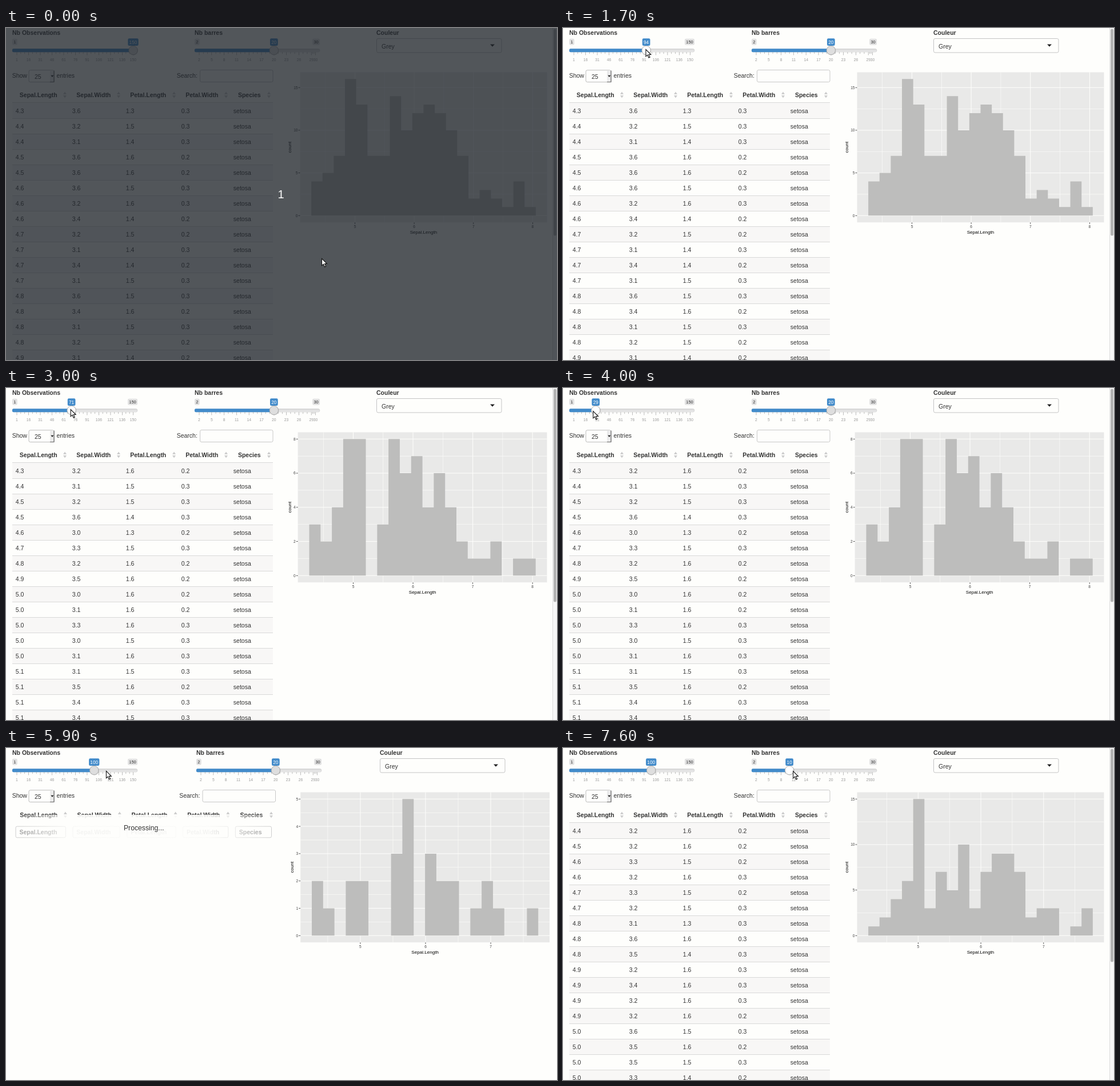
An HTML page for the animation above (8000 ms loop, 964 by 581 pixels).

```html
<!DOCTYPE html>
<html lang="fr">
<head>
<meta charset="utf-8">
<title>Iris</title>
<style>
html, body { margin: 0; width: 100%; height: 100%; overflow: hidden; background: #fefefc; }
svg { display: block; font-family: "Liberation Sans", Arial, sans-serif; }
</style>
</head>
<body>
<svg id="stage" width="964" height="581" viewBox="0 0 964 581"></svg>
<script>
const LOOP = 8000, STEP = 100, PAGE = '#fefefc';
const stage = document.getElementById('stage');

// Samples: bin counts, longest sepal, sorted sepal lengths as [row, length] key points
const samples = [
  { counts: [4, 5, 7, 16, 13, 7, 7, 14, 10, 12, 13, 12, 10, 7, 2, 3, 2, 1, 4, 1], hi: 7.9,
    sepals: [[0, 4.3], [5, 4.58], [16, 4.87]], thumb: 362 },
  { counts: [3, 2, 4, 8, 8, 0, 3, 8, 6, 7, 4, 6, 4, 2, 1, 1, 2, 0, 1, 1], hi: 7.9,
    sepals: [[0, 4.3], [8, 4.96], [16, 5.14]], thumb: 373 },
  { counts: [2, 1, 0, 2, 2, 0, 0, 3, 5, 0, 3, 2, 2, 0, 1, 2, 1, 0, 0, 1], hi: 7.6,
    sepals: [[0, 4.6], [4, 4.87], [10, 5.08], [11, 5.5], [15, 5.68], [16, 6.6]], thumb: 373 },
  { counts: [1, 2, 4, 6, 15, 3, 7, 5, 10, 3, 7, 9, 9, 7, 2, 3, 3, 0, 1, 3], hi: 7.7,
    sepals: [[0, 4.42], [4, 4.72], [16, 5.05]], thumb: 373 }
];
// Smallest value and spread of sepal width, petal length, petal width
const species = {
  setosa: [[3, .6], [1.3, .35], [.15, .2]],
  versicolor: [[2.4, .6], [3.9, .7], [1.2, .3]]
};
const heads = ['Sepal.Length', 'Sepal.Width', 'Petal.Length', 'Petal.Width', 'Species'];
const edges = [11, 110, 204, 301, 392, 467];

// Phases: start time, sample, busy flag
const phases = [[0, 0, 0], [2600, 0, 1], [3000, 1, 0], [4600, 1, 1], [5000, 2, 0], [5900, 2, 1], [6300, 3, 0]];
const obsKeys = [[1100, 150], [2000, 74], [2100, 74], [2400, 71], [3400, 71], [4000, 29],
  [4200, 29], [4500, 27], [5000, 27], [5800, 100]];
const binKeys = [[6900, 20], [7100, 17], [7200, 17], [7600, 10]];

const linear = u => u, smooth = u => u * u * (3 - 2 * u);
function track(keys, t, ease = smooth) {
  const i = keys.findIndex(k => k[0] > t);
  if (i === 0) return keys[0].slice(1);
  if (i < 0) return keys[keys.length - 1].slice(1);
  const a = keys[i - 1], b = keys[i], e = ease((t - a[0]) / (b[0] - a[0]));
  return a.slice(1).map((v, j) => v + (b[j + 1] - v) * e);
}
function noise(n) {
  const v = Math.sin(n * 12.9898) * 43758.5453;
  return v - Math.floor(v);
}

const rect = (x, y, w, h, fill, more = '') =>
  `<rect x="${x}" y="${y}" width="${w}" height="${h}" fill="${fill}" ${more}/>`;
const text = (x, y, s, size = 10.5, fill = '#333', more = '') =>
  `<text x="${x}" y="${y}" font-size="${size}" fill="${fill}" ${more}>${s}</text>`;
const poly = (d, fill, more = '') => `<path d="${d}" fill="${fill}" ${more}/>`;
const box = (x, y, w, h, stroke = '#c4c4c4') => rect(x, y, w, h, PAGE, `rx="2.5" stroke="${stroke}"`);
const BOLD = 'font-weight="700"', MID = 'text-anchor="middle"', END = 'text-anchor="end"';

const defs = `<defs>
<linearGradient id="veil"><stop offset="0" stop-color="${PAGE}" stop-opacity="0"/>
<stop offset=".25" stop-color="${PAGE}" stop-opacity=".9"/><stop offset=".75" stop-color="${PAGE}" stop-opacity=".9"/>
<stop offset="1" stop-color="${PAGE}" stop-opacity="0"/></linearGradient>
<linearGradient id="rail" x2="0" y2="1"><stop offset="0" stop-color="#d6d6d6"/><stop offset="1" stop-color="#eee"/></linearGradient>
</defs>`;

const obsScale = { x: 11, label: 'Nb Observations', min: 1, max: 150, step: 15 };
const binScale = { x: 330, label: 'Nb barres', min: 2, max: 30, step: 3 };
const along = (c, v) => c.x + 8 + (v - c.min) / (c.max - c.min) * 203.5;

function pill(cx, s, size, h, y, fill, ink) {
  const w = String(s).length * size * .556 + 4.5;
  return rect(cx - w / 2, y, w, h, fill, 'rx="2.2"') + text(cx, 24.6 + size * .36, s, size, ink, MID);
}

function slider(c, v, hot, dx = 0) {
  const { x, min, max, step } = c, hx = along(c, v), endW = String(max).length * 4.17 + 4.5;
  let s = text(x, 12, c.label, 10.5, '#333', BOLD);
  for (let n = min; n <= max; n += step) {
    const next = Math.min(n + step, max);
    s += rect(along(c, n) - .4, 42, .8, 5.5, '#aaa') + text(along(c, n), 58.3, n, 6.75, '#999', MID);
    for (const k of [1, 2])
      s += rect(along(c, n + (next - n) * k / 3) - .4, 42, .8, 3.2, '#aaa');
  }
  s += rect(along(c, max) - .4, 42, .8, 5.5, '#aaa') + text(along(c, max), 58.3, max, 6.75, '#999', MID);
  s += rect(x + .3, 36.5, 218.6, 5.5, 'url(#rail)', 'rx="2.5" stroke="#ccc" stroke-width=".6"');
  s += rect(x, 36.3, hx - x, 6, '#428bca', 'rx="2"');
  s += pill(x + 4.35, min, 7.5, 11, 18.8, '#e1e1e1', '#333');
  if (hx + 9 < x + 219 - endW) s += pill(x + 219 - endW / 2, max, 7.5, 11, 18.8, '#e1e1e1', '#333');
  s += pill(hx, Math.round(v), 8.25, 12.6, 18.3, '#428bca', '#fff');
  s += `<circle cx="${hx + .5}" cy="39.7" r="8" fill="#000" opacity=".15"/>
<circle cx="${hx}" cy="39" r="7.7" fill="${hot ? '#fff' : '#dedede'}" stroke="#aaa" stroke-width=".9"/>`;
  return `<g transform="translate(${dx} 0)">${s}</g>`;
}

function controls(busy) {
  const c = busy ? 654 : 648, q = busy ? 4.5 : 0;
  return text(c, 12, 'Couleur', 10.5, '#333', BOLD) + box(c + .5, 18.5, 218.5, 24.5) +
    text(c + 9, 36, 'Grey') + poly(`M${c + 199} 28.5h8l-4 4.2z`, '#222') +
    text(10.7, 87, 'Show') + box(40, 73.8, 44, 20.8, '#bbb') + rect(77, 74.5, 7, 19.6, '#ebebeb') +
    poly('M84 74.5V94.5H77', 'none', 'stroke="#666" stroke-width="1.2"') +
    poly('M78.4 82.7h5l-2.5 3.2z', '#222') + text(50, 89, '25') + text(88.5, 87, 'entries') +
    text(298.7 + q, 87, 'Search:') + box(339.5 + q, 73.5, 127.5, 21, '#c8c8c8');
}

function header(busy) {
  const grow = busy ? 460 / 456 : 1;
  const at = edges.map(e => 11 + (e - 11) * grow);
  let s = '', fields = '';
  heads.forEach((h, i) => {
    const l = at[i], r = at[i + 1];
    s += text((l + r) / 2 - 3.7, 121, h, 10.5, '#333', `${BOLD} ${MID}`) +
      poly(`M${r - 10} 116h6l-3 -4.5zm0 2h6l-3 4.5z`, '#ccc');
    fields += box(l + 6, 137.2, r - l - 12.5, 19.6, '#ccc') + text(l + 12.5, 151, h, 10.5, '#999', BOLD);
  });
  return busy ? s + fields + rect(11, 117, 460, 46, 'url(#veil)') +
    text(241.2, 144, 'Processing...', 12.2, '#333', MID) : s;
}

function table(id) {
  let s = '';
  for (let i = 0; i < 17; i++) {
    const y = 131 + 27 * i, sepal = track(samples[id].sepals, i, linear)[0];
    const kind = sepal < 5.3 ? 'setosa' : 'versicolor';
    const sizes = species[kind].map(([low, spread], j) => low + spread * noise(id * 99 + i * 3 + j + 1));
    const cells = [sepal, ...sizes].map(n => n.toFixed(1)).concat(kind);
    if (i % 2 === 0) s += rect(11, y, 456, 27, '#f8f7f6');
    s += rect(11, y - (i ? 0 : 1), 456, 1, '#d9d9d9');
    cells.forEach((c, j) => s += text(edges[j] + 5.8, y + 18, c));
  }
  return s;
}

function chart({ counts, hi }, dx) {
  const max = Math.max(...counts), tick = max > 10 ? 5 : max > 5 ? 2 : 1;
  const L = max > 9 ? 514.5 : 510.7, R = 946.5, top = 77.5, bottom = 340.2, zero = 328.3;
  const lo = 4.3, bin = (hi - lo) / 19, barW = (R - L) / 22, left = L + barW;
  const start = (Math.floor(lo / bin - .5) + .5) * bin;
  const px = n => left + (n - start) / bin * barW, py = n => zero - n / max * 239;
  let s = rect(L, top, R - L, bottom - top, '#e9e9e8'), axes = '';
  for (let n = 0; n <= max; n += tick / 2) {
    const major = n % tick === 0, w = major ? 1 : .6;
    s += rect(L, py(n) - w / 2, R - L, w, PAGE);
    if (major) axes += rect(L - 3, py(n) - .4, 3, .8, '#333') + text(L - 4, py(n) + 2.4, n, 6.6, '#444', END);
  }
  for (let n = 4.5; px(n) < R; n += .5) {
    const major = n % 1 === 0, w = major ? 1 : .6;
    s += rect(px(n) - w / 2, top, w, bottom - top, PAGE);
    if (major) axes += rect(px(n) - .4, bottom, .8, 2.8, '#333') + text(px(n), 349.6, n, 6.6, '#444', MID);
  }
  const steps = counts.map((n, i) => `V${py(n)}H${left + barW * (i + 1)}`).join('');
  s += poly(`M${left} ${zero}${steps}V${zero}z`, '#bdbdbc') + axes;
  s += text((L + R) / 2, 359.7, 'Sepal.Length', 8.1, '#000', MID);
  s += text(0, 0, 'count', 8.1, '#000', `${MID} transform="translate(498.8 208.7) rotate(-90)"`);
  return `<g transform="translate(${dx} 0)">${s}</g>`;
}

const scrollbar = h => rect(956, 0, 8, 581, '#f7f7f7') + rect(956, 0, 1, 581, '#ddd') +
  rect(958, 1.5, 5, h, '#b2b2b2', 'rx="2.5"');

// The pointer moves freely between drags and holds on to the handle during them
function pointer(t, obs, bins) {
  if (t < 900) return track([[300, 552, 403], [400, 549, 398], [700, 236, 60], [800, 236, 60], [900, 221, 37]], t);
  const [grip, y] = track([[1100, -1, 37], [3400, -2, 37], [4000, -5, 40], [5800, -4, 40]], t);
  if (t < 5900) return [along(obsScale, obs) + grip, y];
  if (t < 6800) return track([[5800, 150, 40], [6400, 486, 38], [6500, 486, 38], [6800, 475, 40]], t);
  return [along(binScale, bins) + 6, 40];
}

const arrow = ([x, y]) => poly('M.5 .5V12.8L3.4 10.2L5.5 15L7.6 14.1L5.5 9.5H9.4z', '#fff',
  `stroke="#111" stroke-width="1.1" transform="translate(${x} ${y})"`);

function scene(t) {
  const [, id, busy] = phases.filter(p => p[0] <= t).pop();
  const obs = track(obsKeys, t)[0], bins = track(binKeys, t)[0];
  let s = defs + rect(0, 0, 964, 581, PAGE);
  s += slider(obsScale, obs, t >= 900 && t < 5900) + slider(binScale, bins, t >= 6800, busy ? 3 : 0);
  s += controls(busy) + chart(samples[id], busy ? 4.5 : 0) + header(busy);
  if (!busy) s += table(id) + scrollbar(samples[id].thumb);
  if (t < 400) s += rect(0, 0, 964, 581, '#1f242a', 'opacity=".77"') + text(481, 298, '1', 20, '#fff', MID);
  return s + arrow(pointer(t, obs, bins));
}

let last = -1;
function tick() {
  const t = Math.floor(performance.now() % LOOP / STEP) * STEP;
  if (t !== last) stage.innerHTML = scene(last = t);
  requestAnimationFrame(tick);
}
tick();
</script>
</body>
</html>
```
